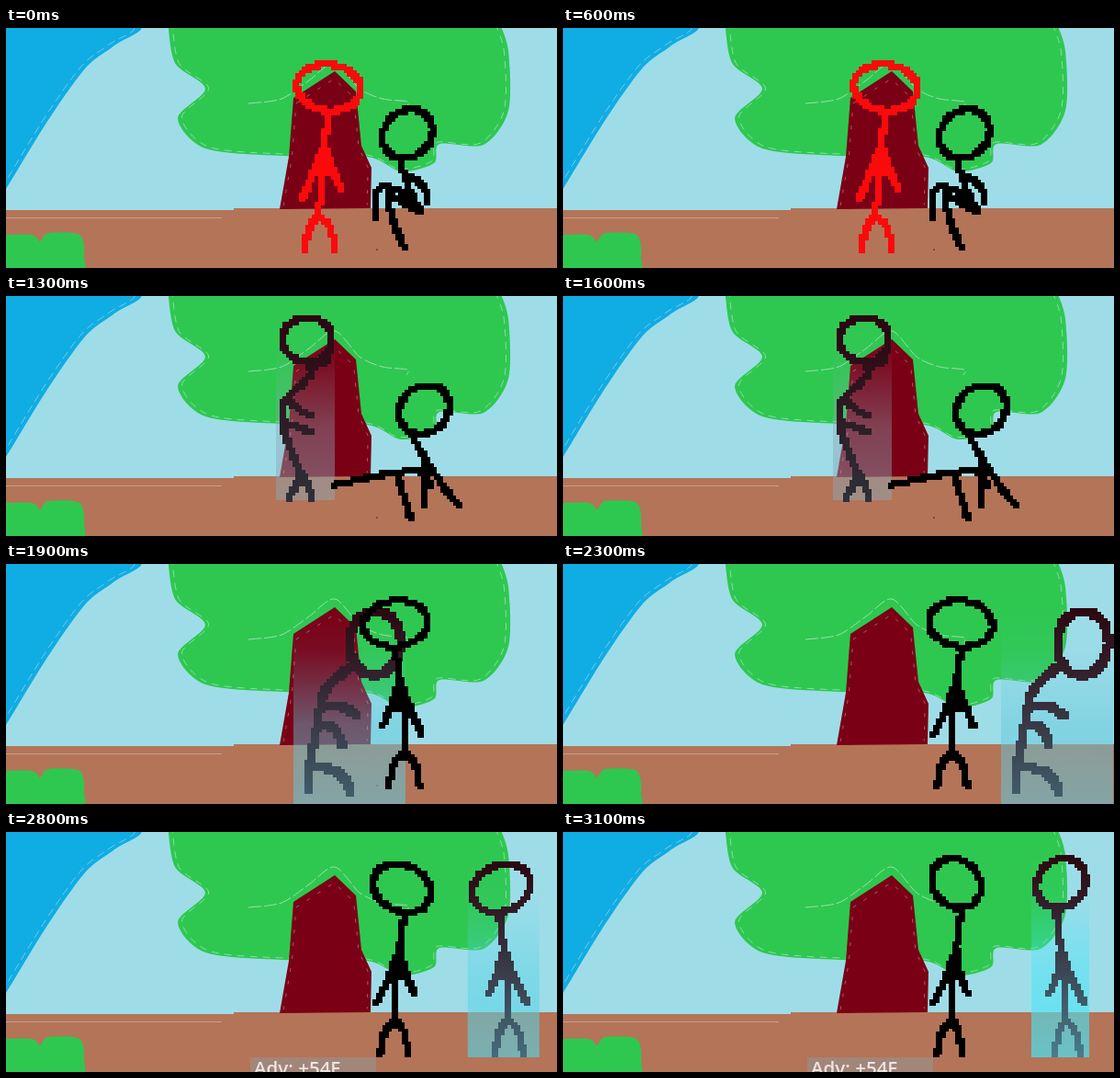
These frames come from a looping animation (600 px wide and 261 px high, 3.2 s). An HTML page with a canvas:

```html
<!DOCTYPE html>
<html lang="en">
<head>
<meta charset="utf-8">
<title>Stick fight</title>
<style>
html, body { margin: 0; width: 100%; height: 100%; overflow: hidden; background: #9edde8; }
canvas { display: block; width: 600px; height: 261px; }
</style>
</head>
<body>
<canvas id="stage" width="600" height="261"></canvas>
<script>
const ctx = document.getElementById('stage').getContext('2d');
const LOOP = 3200, STEP = 100, CELL = 3.5;
const GREEN = '#2ec850', PALE = '#8bdda4';

const clamp = v => Math.max(0, Math.min(1, v));
const mix = (a, b, k) => Array.isArray(a) ? a.map((v, i) => mix(v, b[i], k)) : a + (b - a) * k;
const pts = s => s.split(' ').map(p => p.split(',').map(Number));

// Dense samples of a soft curve through a few key points.
function curve(keys) {
  const p = pts(keys), at = i => p[Math.max(0, Math.min(p.length - 1, i))];
  const out = [];
  for (let i = 0; i < p.length - 1; i++) {
    for (let j = 0; j < 10; j++) {
      const t = j / 10, u = 1 - t;
      out.push([0, 1].map(k => {
        const a = at(i)[k], b = at(i + 1)[k];
        const c = a + (b - at(i - 1)[k]) / 7, d = b - (at(i + 2)[k] - a) / 7;
        return u * u * u * a + 3 * u * u * t * c + 3 * u * t * t * d + t * t * t * b;
      }));
    }
  }
  return [...out, p[p.length - 1]];
}

// head: centre x, centre y, radius x, radius y, tilt
const pose = (head, limbs, width = 7) => ({ head, limbs: limbs.map(curve), width });

const stand = (head, neck, hand, foot) => pose(head, [
  `${neck} 428,128 424,168 423,205`,
  '427,130 416,159 404,185',
  `429,130 ${hand - 8},157 ${hand}${',176'}`,
  '424,140 424,164',
  '429,138 432,157',
  '422,205 412,218 407,241',
  `424,205 ${foot - 5},217 ${foot},241`
]);

const low = stand([433, 64.5, 35, 25, 0.12], '434,90', 447, 440);
const tall = stand([428, 55.5, 29, 25, 0.8], '434,82', 441, 435);

const crouch = pose([437, 115, 29, 25, -0.7], [
  '429,143 440,182',
  '438,160 455,172 458,188',
  '402,208 404,177 418,173 445,184',
  '416,180 452,201',
  '430,183 452,198',
  '415,182 421,209 433,239'
]);

const kick = pose([455, 123, 29, 25, -0.7], [
  '442,151 463,192',
  '357,205 397,197 428,191 464,191',
  '426,194 440,240',
  '456,192 455,227',
  '463,187 480,213 493,227',
  '456,187 462,208'
]);

const stagger = pose([328, 47, 27, 24, 0], [
  '350,70 330,78',
  '328,74 331,86 303,115 302,145 322,196',
  '306,113 331,131',
  '306,138 332,148',
  '322,196 307,219',
  '324,196 334,219'
]);

const launched = pose([565.5, 86, 28, 35, 0.1], [
  '545,108 512,136 501,185 495,215 493,246',
  '506,157 525,153 547,165',
  '506,174 521,179 530,197',
  '497,220 526,226 540,247'
], 9);

const mountain = curve('0,-9 143,-3 118,19 87,43 46,100 0,175');
const leaves = curve('176,-9 184,38 217,66 187,98 217,131 300,139 393,140 430,156 466,147 472,126 520,127 547,90 547,25 536,-9');
const trunk = pts('298,197 308,140 313,76 358,47 381,69 387,128 398,152 397,196');
const bush = curve('-9,225 28,225 37,232 46,223 80,225 85,248 78,270 -9,270');

function trace(path) {
  ctx.beginPath();
  path.forEach(([x, y]) => ctx.lineTo(x, y));
}

function fill(path, color) {
  trace(path);
  ctx.fillStyle = color;
  ctx.fill();
}

function thread(path, color, dash = []) {
  trace(path);
  ctx.strokeStyle = color;
  ctx.setLineDash(dash);
  ctx.stroke();
}

// Shrink a path towards a point, for the pale seam inside an edge.
const inset = (path, centre, k) => path.map(p => mix(p, centre, k));

function background() {
  ctx.fillStyle = '#9edde8';
  ctx.fillRect(0, 0, 600, 261);
  fill(mountain, '#10ace4');
  thread(inset(mountain, [0, 0], 0.05), '#72cde9', [9, 5]);
  fill(leaves, GREEN);
  thread(inset(leaves, [365, 60], 0.025), PALE, [8, 6]);
  ctx.fillStyle = '#b47458';
  ctx.fillRect(0, 198, 248, 63);
  ctx.fillRect(248, 196, 352, 65);
  thread([[0, 206.5], [235, 206.5]], '#c5a08c');
  fill(trunk, '#7a0016');
  thread(inset(trunk, [350, 150], 0.08), '#a85a6a', [4, 10]);
  thread(curve('264,82 300,77 330,57 358,38 385,66 410,77 437,80 436,86'), '#9edfb0', [14, 3]);
  fill(bush, GREEN);
  ctx.fillStyle = '#7a4a38';
  ctx.fillRect(403, 240, 2, 2);
}

// Drag a square brush along a path on a coarse pixel grid.
function brush(path, width) {
  const snap = v => Math.round(Math.round(v / CELL) * CELL - width / 2);
  for (let i = 1; i < path.length; i++) {
    const a = path[i - 1], b = path[i];
    const n = Math.ceil(Math.hypot(b[0] - a[0], b[1] - a[1]) / 2) || 1;
    for (let j = 0; j <= n; j++) {
      const [x, y] = mix(a, b, j / n);
      ctx.fillRect(snap(x), snap(y), width, width);
    }
  }
}

// With a mirror value, x becomes mirror - x.
function fighter({ head, limbs, width }, color, dx = 0, mirror = null) {
  const place = ([x, y]) => [mirror === null ? x + dx : mirror - x, y];
  const [cx, cy, rx, ry, tilt] = head;
  const c = Math.cos(tilt), s = Math.sin(tilt);
  const ring = Array.from({ length: 41 }, (_, i) => {
    const u = rx * Math.cos(i * Math.PI / 20), v = ry * Math.sin(i * Math.PI / 20);
    return [cx + u * c - v * s, cy + u * s + v * c];
  });
  ctx.fillStyle = color;
  [ring, ...limbs].forEach(path => brush(path.map(place), width));
}

function fade(top, height, ...stops) {
  const g = ctx.createLinearGradient(0, top, 0, top + height);
  stops.forEach(([at, color]) => g.addColorStop(at, color));
  return g;
}

function ghost(p, [x, y, w, h], { tint, power, ink }, dx, mirror) {
  const veil = k => `rgba(${tint},${power * k})`;
  ctx.fillStyle = fade(y, h, [0, veil(0)], [0.22, veil(0.1)], [0.6, veil(0.75)], [1, veil(1)]);
  ctx.fillRect(x, y, w, h);
  const shade = k => `rgb(${mix([44, 6, 16], ink, k)})`;
  fighter(p, fade(y, h, [0, shade(0)], [0.3, shade(0.25)], [1, shade(1)]), dx, mirror);
}

const dusk = { tint: [140, 165, 178], power: 0.52, ink: [46, 48, 56] };
const water = { tint: [95, 200, 220], power: 0.58, ink: [66, 96, 110] };
const glow = { tint: [72, 228, 245], power: 0.7, ink: [72, 125, 142] };

function label() {
  ctx.fillStyle = 'rgba(150,145,142,.62)';
  ctx.fillRect(266, 245, 137, 16);
  ctx.fillStyle = '#ebe5e2';
  ctx.font = '600 20.5px "Open Sans", "Noto Sans", sans-serif';
  ctx.fillText('Adv: +54F', 270, 264);
}

function render(t) {
  background();
  if (t < 1000) {
    fighter(low, '#fb0a0c', -82);
    fighter(crouch, '#000');
    return;
  }
  if (t < 1700) {
    ghost(stagger, [294, 22, 64, 200], dusk);
    fighter(kick, '#000');
    return;
  }
  const rise = clamp((t - 2600) / 500);
  const idle = {
    head: mix(low.head, tall.head, rise),
    limbs: mix(low.limbs, tall.limbs, rise),
    width: low.width
  };
  if (t < 2500) {
    const dx = Math.min(0, (t - 2300) * 0.41);
    ghost(launched, [477 + dx, 45, 122, 216], water, dx);
  } else {
    const tone = {
      tint: mix(water.tint, glow.tint, rise),
      power: mix(water.power, glow.power, rise),
      ink: mix(water.ink, glow.ink, rise)
    };
    ghost(idle, mix([498, 35, 88, 210], [510, 25, 63, 220], rise), tone, 0, 970);
    label();
  }
  if (t < 1800) fighter(crouch, '#000');
  else fighter(idle, '#000', 0, t < 2100 ? 857 : null);
}

function tick() {
  const t = performance.now() % LOOP;
  render(Math.floor(t / STEP) * STEP);
  requestAnimationFrame(tick);
}
tick();
</script>
</body>
</html>
```
